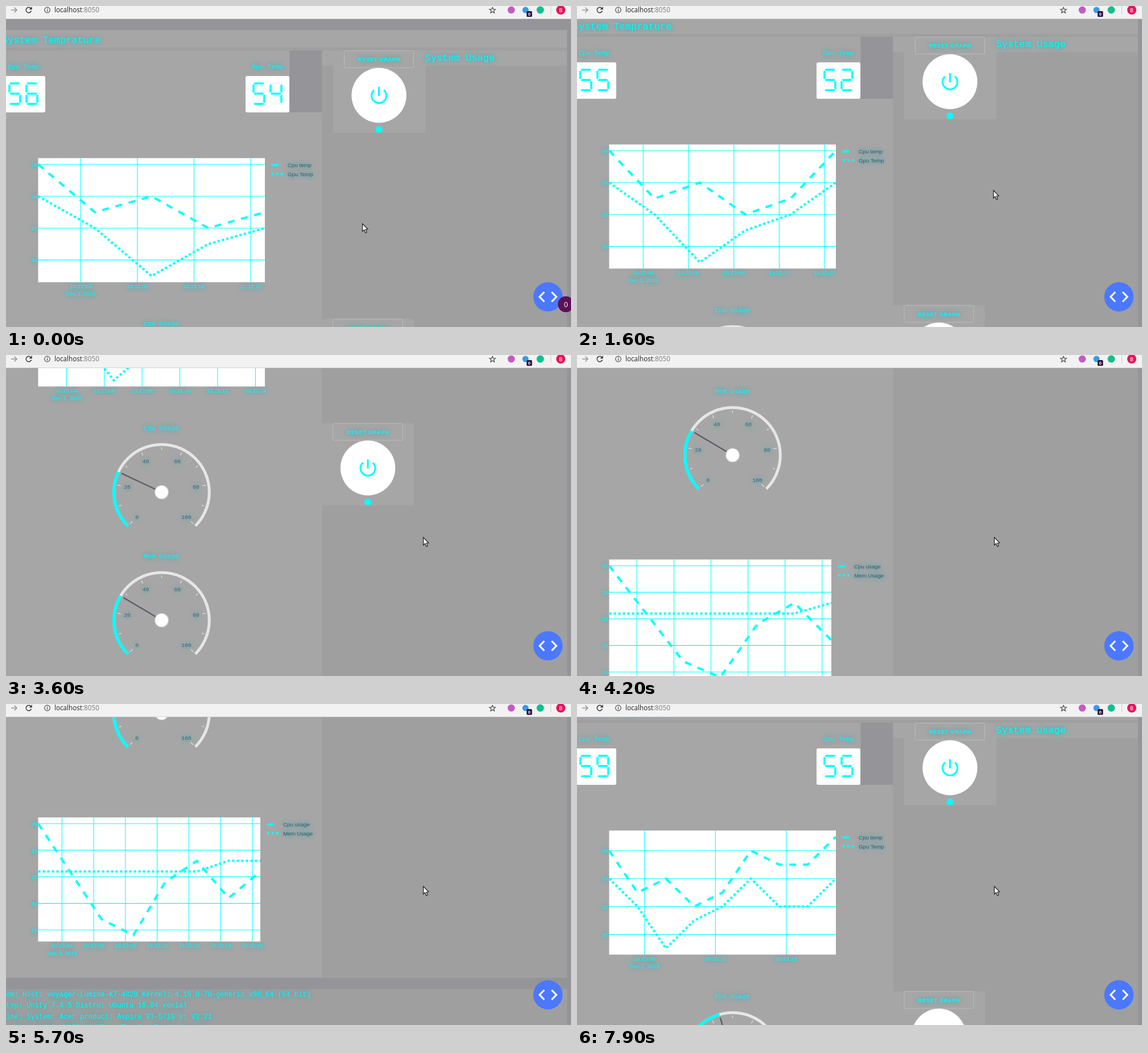
Recreate the animation shown at these times as an HTML page with a canvas. Size 993x564 px, loop 8 s.

```html
<!DOCTYPE html>
<html lang="en">
<head>
<meta charset="utf-8">
<title>System dashboard</title>
<style>
html, body { margin: 0; width: 100%; height: 100%; overflow: hidden; background: #9f9f9f; }
canvas { display: block; }
</style>
</head>
<body>
<canvas id="stage" width="993" height="564"></canvas>
<script>
const ctx = document.getElementById('stage').getContext('2d');
const LOOP = 8000, TAU = Math.PI * 2;
const CYAN = '#00ffff', LIGHT = '#a6a6a6', MID = '#9f9f9f', DARK = '#959499';
const MONO = '"Liberation Mono", monospace', SANS = '"Liberation Sans", sans-serif';

// One sample every two seconds, beginning at 10:22:02.5
const temps = {
  names: ['Cpu temp', 'Gpu Temp'], width: 398.5, step: 2,
  rows: [[56, 53, 54, 52, 53, 56, 55, 55, 57, 59], [54, 52, 49, 51, 52, 54, 52, 52, 54, 55]]
};
const usage = {
  names: ['Cpu usage', 'Mem Usage'], width: 390.5, step: 5,
  rows: [[35, 26, 17, 14, 24, 28, 21, 26, 42, 44], [26, 26, 26, 26, 26, 26, 28, 28, 29, 29]]
};
const info = [
  'System: Host: voyager-Lumina-K7-482B Kernel: 4.15.0-70-generic x86_64 (64 bit)',
  'Desktop: Unity 7.4.5 Distro: Ubuntu 16.04 xenial',
  'Machine: System: Acer product: Aspire V3-571G v: V2.21',
  'Mobo: Acer model: VA50_HC_CR v: Type2 - Board Version',
  'Bios: Insyde v: V2.21 date: 12/16/2013',
  'CPU: Dual core Intel Core i5-3230M (-HT-MCP-) cache: 3072 KB',
  'clock speeds: max: 3200 MHz 1: 1291 MHz 2: 1376 MHz 3: 1389 MHz',
  '4: 1314 MHz',
  'Graphics: Card-1: Intel 3rd Gen Core processor Graphics Controller',
  'Display Server: X.Org 1.18.4 driver: intel',
  'Resolution: 1366x768@60.00hz',
  'GLX Version: 3.0 Mesa 18.0.5'
];

// Stops are [time, value]: linear between stops, or held until the next one
const scrollHolds = [[0, 0], [100, 12], [200, 24], [2400, 233.5], [3600, 430], [3800, 500], [3900, 572],
  [4000, 643], [4200, 720], [4700, 852], [4800, 984], [5200, 1012], [5300, 1040], [5700, 880],
  [5900, 745], [6100, 643], [6500, 422.5], [6800, 340], [7100, 220], [7600, 57], [7900, 45]];
const graphCount = [[0, 5], [900, 6], [3600, 7], [5000, 8], [7100, 9]];
const liveIndex = [[0, 5], [1400, 6], [3600, 7], [5700, 8], [7600, 9]];

const held = (stops, t) => stops.filter(s => s[0] <= t).pop()[1];
const clamp01 = v => Math.max(0, Math.min(1, v));
const mix = (a, b, k) => a + (b - a) * k;

function scrollAt(t) {
  if (t >= 1600 && t < 2400) return mix(24, 233.5, (t - 1600) / 800);
  return held(scrollHolds, t);
}

function box(x, y, w, h, color) {
  ctx.fillStyle = color;
  ctx.fillRect(x, y, w, h);
}

function disc(x, y, r, color) {
  ctx.fillStyle = color;
  ctx.beginPath();
  ctx.arc(x, y, r, 0, TAU);
  ctx.fill();
}

function path(points, color, width) {
  ctx.strokeStyle = color;
  ctx.lineWidth = width;
  ctx.beginPath();
  points.forEach(p => ctx.lineTo(p[0], p[1]));
  ctx.stroke();
}

function arc(x, y, r, from, to, color, width) {
  ctx.strokeStyle = color;
  ctx.lineWidth = width;
  ctx.beginPath();
  ctx.arc(x, y, r, from, to);
  ctx.stroke();
}

function round(x, y, w, h, r) {
  ctx.beginPath();
  ctx.roundRect(x, y, w, h, r);
}

function label(text, x, y, font, color, align = 'left') {
  ctx.font = font;
  ctx.fillStyle = color;
  ctx.textAlign = align;
  ctx.textBaseline = 'alphabetic';
  ctx.fillText(text, x, y);
}

function glow(text, x, y, font, color = CYAN, align = 'left') {
  ctx.save();
  ctx.shadowColor = '#10a4b4';
  ctx.shadowBlur = 9;
  label(text, x, y, font, color, align);
  ctx.restore();
}

function digit(value, x, y) {
  const on = [119, 18, 93, 91, 58, 107, 111, 82, 127, 123][value];
  const segs = [[2, 2, 21, 2], [2, 3, 2, 19], [21, 3, 21, 19], [2, 20, 21, 20],
    [2, 21, 2, 37], [21, 21, 21, 37], [2, 38, 21, 38]];
  segs.forEach(([x1, y1, x2, y2], i) => {
    const lit = on >> (6 - i) & 1;
    const dx = x1 === x2 ? 0 : 2.5, dy = dx ? 0 : 2.5;
    ctx.lineCap = 'round';
    path([[x + x1 + dx, y + y1 + dy], [x + x2 - dx, y + y2 - dy]], lit ? CYAN : '#f8f8f8', 3.7);
  });
  ctx.lineCap = 'butt';
}

function led(name, right, value) {
  glow(name, right - 38.5, 110, '11.4px ' + MONO, CYAN, 'center');
  round(right - 77, 123, 77, 64, 3);
  ctx.fillStyle = '#fff';
  ctx.fill();
  digit(Math.floor(value / 10), right - 65, 134);
  digit(value % 10, right - 35, 134);
}

function power(x, y) {
  round(x - 61, y + .5, 122, 30, 2.5);
  ctx.strokeStyle = '#bcbcbc';
  ctx.lineWidth = 1;
  ctx.stroke();
  ctx.letterSpacing = '0.95px';
  glow('RESET GRAPH', x + .5, y + 19, 'bold 8.8px ' + SANS, CYAN, 'center');
  ctx.letterSpacing = '0px';
  const cy = y + 79;
  disc(x, cy, 48.2, '#fff');
  arc(x, cy + .5, 13, -TAU / 4 + .72, TAU * .75 - .72, CYAN, 3.2);
  path([[x, cy - 15], [x, cy + 1]], CYAN, 3.2);
  disc(x, y + 139, 6, CYAN);
}

function chart(set, n, top) {
  const left = 56.5, height = 218, { width, step } = set;
  const rows = set.rows.map(r => r.slice(0, n));
  const all = rows.flat(), min = Math.min(...all), max = Math.max(...all);
  const unit = height * .9 / (max - min), span = 2 * (n - 1);
  const px = sec => left + (sec - 2.5) / span * width;
  const py = v => top + height * .05 + (max - v) * unit;
  const font = '9.7px ' + SANS;
  const bottom = top + height;

  box(left, top, width, height, '#fff');
  const low = min - (max - min) / 18, high = max + (max - min) / 18;
  for (let v = Math.ceil(low / step) * step; v <= high; v += step) {
    path([[left, py(v)], [left + width, py(v)]], CYAN, 1.1);
    glow(v, left - 1.5, py(v) + 3.7, font, CYAN, 'right');
  }
  const gap = n > 8 ? 5 : 2;
  for (let s = n > 8 ? 5 : 4, first = true; s <= 2.5 + span; s += gap, first = false) {
    path([[px(s), top], [px(s), bottom]], CYAN, 1.1);
    glow('10:22:' + String(s).padStart(2, '0'), px(s), bottom + 10.5, font, CYAN, 'center');
    if (first) glow('Dec 3, 2019', px(s), bottom + 23.5, font, CYAN, 'center');
  }

  rows.forEach((row, i) => {
    const dash = i ? [4, 4] : [12, 12], ly = top + 12.3 + i * 15.4, lx = left + width + 12;
    ctx.save();
    ctx.setLineDash(dash);
    path([[lx, ly], [lx + 20, ly]], CYAN, 4);
    ctx.beginPath();
    ctx.rect(left, top, width, height);
    ctx.clip();
    path(row.map((v, k) => [px(2.5 + 2 * k), py(v)]), CYAN, 4);
    ctx.restore();
    glow(set.names[i], lx + 28, ly + 3.5, font, '#2c606c');
  });
}

function gauge(name, value, y) {
  const x = 273.5, angle = v => (135 + v * 2.7) * Math.PI / 180;
  const polar = (v, r) => [x + r * Math.cos(angle(v)), y + r * Math.sin(angle(v))];
  glow(name, x - .5, y - 109, '11.3px ' + MONO, CYAN, 'center');
  arc(x, y, 83.8, angle(0), angle(100), '#e6e6e6', 5);
  arc(x, y, 83.8, angle(0), angle(value), CYAN, 5.5);
  for (let v = 0; v <= 100; v += 10) {
    const major = v % 20 === 0;
    path([polar(v, major ? 72.5 : 74.5), polar(v, 78.5)], '#dcdcdc', 1.4);
    if (major) {
      const [lx, ly] = polar(v, 61.3);
      glow(v, lx, ly + 3.3, '9.7px ' + MONO, '#34687a', 'center');
    }
  }
  path([[x, y], polar(value, 78)], '#5d5d68', 2.4);
  disc(x, y, 12.3, '#dedede');
  disc(x, y, 11, '#fff');
}

function page(t) {
  const n = held(graphCount, t), live = held(liveIndex, t);
  const heading = '17px ' + MONO;

  box(0, 0, 993, 1361, MID);
  box(0, 0, 986, 42, DARK);
  box(0, 42, 986, 31, LIGHT);
  box(0, 78, 555.5, 1283, LIGHT);
  box(498.5, 78, 57, 109, DARK);
  box(555.5, 78, 430.5, 27, LIGHT);
  box(575, 78, 162, 145, LIGHT);
  box(555, 549.5, 162, 145, LIGHT);
  box(0, 1361, 986, 20, DARK);
  box(0, 1381, 986, 700, MID);
  box(986, 0, 7, 2100, DARK);

  glow('System Temprature', -7, 65, heading);
  glow('System Usage', 736.5, 96, heading);
  led('Cpu Temp', 69, temps.rows[0][live]);
  led('Gpu Temp', 498, temps.rows[1][live]);
  power(655.5, 78);
  power(636, 549.5);
  chart(temps, n, 267.3);
  gauge('Cpu Usage', usage.rows[0][live], 671);
  gauge('Mem Usage', usage.rows[1][live], 896);
  chart(usage, n, 1079.3);
  info.forEach((line, i) => glow(line, -29, 1394 + i * 19.3, '12.07px ' + MONO));
}

function toolbar() {
  box(0, 0, 993, 23, '#f2f2f2');
  box(0, 22, 993, 1, '#d2d2d3');
  path([[9, 7], [19, 7]], '#949494', 1.5);
  path([[14.5, 2.5], [19, 7], [14.5, 11.5]], '#949494', 1.5);
  arc(40, 7, 4.7, .35, TAU - .8, '#3c3c3c', 1.6);
  ctx.fillStyle = '#3c3c3c';
  ctx.beginPath();
  [[45.8, 1], [45.8, 6.3], [40.5, 6.3]].forEach(p => ctx.lineTo(...p));
  ctx.fill();
  arc(72.5, 7, 4.8, 0, TAU, '#4d4d4d', 1.2);
  box(71.9, 6.3, 1.3, 3.5, '#4d4d4d');
  box(71.9, 4, 1.3, 1.3, '#4d4d4d');
  const font = '11.7px "Open Sans", sans-serif';
  label('localhost', 85, 11, font, '#222');
  label(':8050', 85 + ctx.measureText('localhost').width, 11, font, '#777');

  const star = [];
  for (let i = 0; i <= 10; i++) {
    const a = i * TAU / 10 - TAU / 4, r = i % 2 ? 2.4 : 5.6;
    star.push([855 + r * Math.cos(a), 7.5 + r * Math.sin(a)]);
  }
  path(star, '#4d4d4d', 1.2);
  disc(888, 7, 6.3, '#c45bc4');
  disc(913, 7, 5.5, '#399be8');
  round(915, 9, 9.5, 10, 1.5);
  ctx.fillStyle = '#2a0b36';
  ctx.fill();
  label('0', 919.8, 17, 'bold 8px ' + SANS, '#fff', 'center');
  disc(939, 7, 6.5, '#11c08e');
  box(957, 0, 1, 14, '#cfcfcf');
  disc(975, 7, 8, '#e6125d');
  label('B', 975, 10.6, '9.5px Roboto, sans-serif', '#fff', 'center');
}

function overlays(t) {
  disc(952.5, 511, 25.8, '#4b78ff');
  path([[946, 502.5], [937.8, 511], [946, 519.5]], '#fff', 3.2);
  path([[959, 502.5], [967.2, 511], [959, 519.5]], '#fff', 3.2);
  if (t < 1400) {
    disc(984, 524, 14, '#5b1057');
    label('0', 984, 528.5, '12.5px "Open Sans", sans-serif', '#fff', 'center');
  }
}

function cursor(t) {
  const k = clamp01((t - 600) / 600), late = clamp01((t - 1600) / 400);
  const x = mix(626.5, 732, k) + 1.5 * late, y = mix(382.5, 324, k) - 3.5 * late;
  ctx.beginPath();
  [[0, 0], [0, 13.5], [3, 10.8], [5.2, 16], [7.6, 15], [5.4, 10], [9.3, 9.6]]
    .forEach(([dx, dy]) => ctx.lineTo(x + dx, y + dy));
  ctx.closePath();
  ctx.fillStyle = '#fff';
  ctx.fill();
  ctx.strokeStyle = '#1c1c1c';
  ctx.lineWidth = 1.2;
  ctx.stroke();
}

function draw(now) {
  const t = Math.floor(now % LOOP / 100) * 100;
  ctx.save();
  ctx.beginPath();
  ctx.rect(0, 23, 993, 541);
  ctx.clip();
  ctx.translate(0, -scrollAt(t));
  page(t);
  ctx.restore();
  toolbar();
  overlays(t);
  cursor(t);
}

const start = performance.now();
function tick() {
  draw(performance.now() - start);
  requestAnimationFrame(tick);
}
tick();
</script>
</body>
</html>
```
